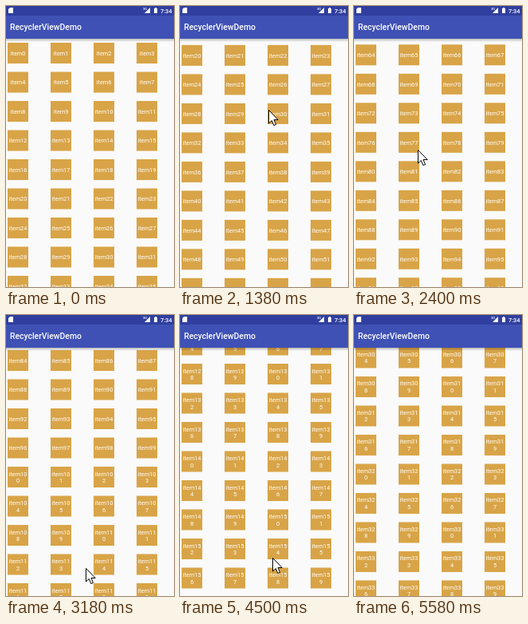
An HTML page with a canvas that plays this animation: 211x352 px, repeating every 5.61 s.

```html
<!DOCTYPE html>
<html lang="en">
<head>
<meta charset="utf-8">
<title>RecyclerViewDemo</title>
<style>
  html, body { margin: 0; width: 211px; height: 352px; overflow: hidden; background: #fafafa; }
  canvas { display: block; }
</style>
</head>
<body>
<canvas id="stage" width="211" height="352"></canvas>
<script>
const ctx = document.getElementById('stage').getContext('2d');
const W = 211, H = 352, LOOP = 5610, STEP = 30;
const BAR = 41, BOX = 26, ROW = 36.5, COL = 54, TOP = 46;

const linear = u => u;
const speedUp = u => u * u;
const smooth = u => u * u * (3 - 2 * u);
const slow = p => u => 1 - (1 - u) ** p;

// Each key: time, value(s), easing used to arrive there
const scrollKeys = [
  [930, [0]],
  [1350, [153], speedUp], [2100, [384], slow(3)],
  [2110, [384]],
  [2350, [534], speedUp], [3035, [768.5], slow(3)],
  [3180, [768.5]],
  [3390, [943.5], speedUp], [3720, [1153], slow(3)],
  [4530, [1153]],
  [4680, [1317], speedUp], [6090, [2805], slow(4)]
];
const cursorKeys = [
  [300, [212, 132]], [810, [106, 283], smooth], [930, [106, 283]],
  [1350, [111, 130], speedUp], [1380, [111, 130]],
  [2010, [90, 318], smooth], [2110, [90, 318]],
  [2350, [79, 168], speedUp], [2400, [80, 180]],
  [3180, [100, 317], smooth],
  [3390, [137, 142], speedUp], [3780, [137, 142]],
  [3900, [141, 160], smooth], [4200, [141, 160]],
  [4440, [116, 304], smooth], [4530, [116, 304]],
  [4680, [125, 140], speedUp], [5010, [197, 143]], [5070, [215, 143]]
];

function valueAt(keys, t) {
  const i = keys.findIndex(k => k[0] > t);
  if (i === 0) return keys[0][1];
  if (i < 0) return keys[keys.length - 1][1];
  const [t0, from] = keys[i - 1];
  const [t1, to, ease = linear] = keys[i];
  const u = ease((t - t0) / (t1 - t0));
  return from.map((v, n) => v + (to[n] - v) * u);
}

function rect(color, x, y, w, h) {
  ctx.fillStyle = color;
  ctx.fillRect(x, y, w, h);
}

function polygon(points, x = 0, y = 0) {
  ctx.beginPath();
  points.forEach(([px, py]) => ctx.lineTo(x + px, y + py));
  ctx.closePath();
}

function text(str, x, y, size, align = 'left', weight = 400) {
  ctx.font = `${weight} ${size}px Roboto, sans-serif`;
  ctx.textAlign = align;
  ctx.fillStyle = '#fff';
  ctx.fillText(str, x, y);
}

function drawItem(n, x, y) {
  rect('#d8a447', x, y, BOX, BOX);
  const label = 'item' + n, mid = x + BOX / 2;
  if (label.length < 7) return text(label, mid, y + 15.7, 7.3, 'center');
  text(label.slice(0, 6), mid, y + 11.5, 7.3, 'center');
  text(label.slice(6), mid, y + 20, 7.3, 'center');
}

function drawList(scroll) {
  const first = Math.max(0, Math.floor((scroll - TOP) / ROW));
  for (let row = first; TOP + row * ROW - scroll < H; row++)
    for (let col = 0; col < 4; col++)
      drawItem(row * 4 + col, 2 + col * COL, TOP + row * ROW - scroll);
}

function drawBars() {
  const shade = ctx.createLinearGradient(0, BAR, 0, BAR + 4);
  shade.addColorStop(0, 'rgba(0,0,0,.25)');
  shade.addColorStop(1, 'rgba(0,0,0,0)');
  rect(shade, 0, BAR, W, 4);
  rect('#3f51b5', 0, 0, W, BAR);
  rect('#303f9f', 0, 0, W, 12);
  text('RecyclerViewDemo', 5, 30, 10.4, 'left', 500);

  // Status icons: memory card, signal, battery, clock
  ctx.fillStyle = '#fff';
  polygon([[5, 2], [9, 2], [9, 9], [3, 9], [3, 4]]);
  ctx.fill();
  polygon([[181, 2], [181, 9], [174, 9]]);
  ctx.fill();
  text('3G', 172, 5.3, 4, 'left', 500);
  rect('#fff', 186, 3, 4, 6);
  rect('#fff', 187, 2, 2, 1);
  text('7:34', 208.5, 8.7, 7.4, 'right', 500);
}

const arrow = [[0, 0], [0, 16.5], [3.8, 13], [6.3, 19], [9, 18], [6.5, 12], [11.7, 12]];
function drawCursor([x, y]) {
  polygon(arrow, x + .5, y + .5);
  ctx.fillStyle = '#fff';
  ctx.fill();
  ctx.strokeStyle = '#000';
  ctx.lineWidth = 1;
  ctx.stroke();
}

function draw(t) {
  rect('#fafafa', 0, 0, W, H);
  drawList(valueAt(scrollKeys, t)[0]);
  drawBars();
  drawCursor(valueAt(cursorKeys, t));
}

const start = performance.now();
function frame() {
  const t = (performance.now() - start) % LOOP;
  draw(Math.floor(t / STEP) * STEP);
  requestAnimationFrame(frame);
}
frame();
</script>
</body>
</html>
```
